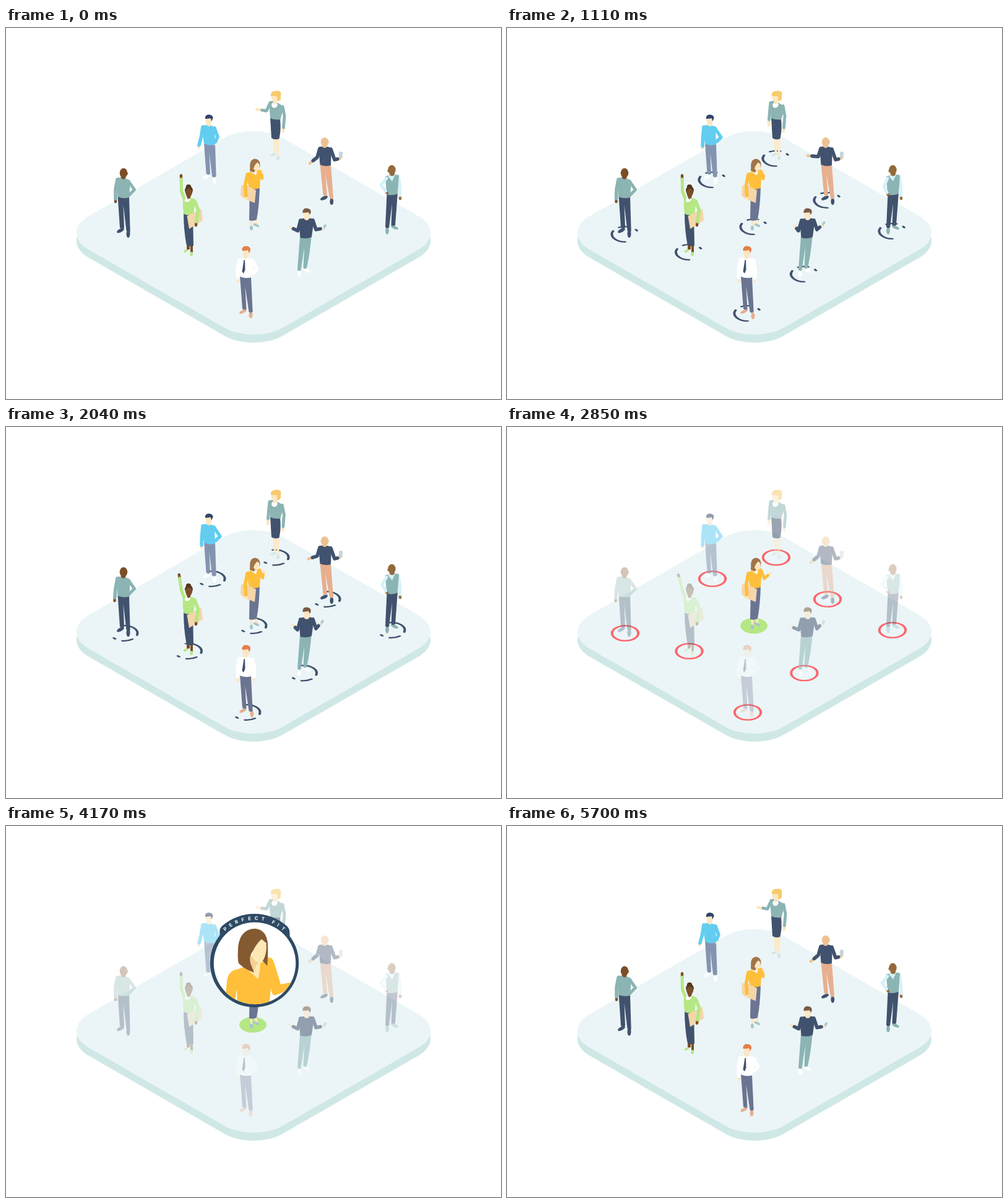
Recreate the animation shown at these times as an HTML page. Size 800 px wide and 600 px high, loop 5730 ms.

```html
<!DOCTYPE html>
<html lang="en">
<head>
<meta charset="utf-8">
<title>Perfect fit</title>
<style>
  html, body { margin: 0; width: 100%; height: 100%; overflow: hidden; background: #fff; }
  svg { display: block; width: 800px; height: 600px; }
  text { font: 700 7.8px Inter, "Open Sans", sans-serif; fill: #fff; text-anchor: middle; }
  .limb path { fill: none; stroke-linecap: round; stroke-linejoin: round; }
</style>
</head>
<body>
<svg id="stage" viewBox="0 0 800 600"></svg>
<script>
const LOOP = 5730;
const KEYS = [0, 1110, 2040, 2850, 3480, 4200];
const NAVY = '#41526e', TEAL = '#8bb4b3', PALE = '#fde6c2', DARK = '#7b4e26', BROWN = '#946a3c',
  GREY = '#6b7491', CORAL = '#e8af8e', BLUE = '#62cdf0', LIME = '#b5e784', GOLD = '#ffbf3b',
  CARD = '#f4d6aa', WHITE = '#fff', INK = '#2e4a64', SKY = '#d6f2fb', TAN = '#edc293';

const clamp = x => Math.min(1, Math.max(0, x));
const lin = (t, a, b) => clamp((t - a) / (b - a));
const ramp = (t, a, b) => { const x = lin(t, a, b); return x * x * (3 - 2 * x); };
const mix = (a, b, k) => a + (b - a) * k;

const P = (fill, d) => `<path fill="${fill}" d="${d}"/>`;
const E = (fill, x, y, rx, ry, rot = 0) =>
  `<ellipse fill="${fill}" cx="${x}" cy="${y}" rx="${rx}" ry="${ry}" transform="rotate(${rot} ${x} ${y})"/>`;

// An arm: shoulder, elbow and hand, blended from base towards alt by the weights at KEYS.
const limbs = [];
function L(skin, sleeve, base, alt = base, weights = [0, 0, 0, 0], { width = 5.6, reach = 4, prop = '' } = {}) {
  limbs.push({ base, alt, weights: [0, ...weights, 0], reach });
  return `<g class="limb"><g>${prop}</g><path stroke="${skin}" stroke-width="4.4"/>` +
    `<path stroke="${sleeve}" stroke-width="${width}"/></g>`;
}

const people = [
  { ring: [435, 211], fade: .52, art: () =>
    P('#fdeac8', 'M431 177L442 178L441 208L438 208L437 186L436 204L433 204Z') +
    E('#d5e6e7', 432, 205, 5, 2, -18) + E('#d5e6e7', 439.5, 210, 2.6, 3.4) +
    P(NAVY, 'M427 145L443 147Q445 164 441.500 179Q435 182 429 178Z') +
    L(PALE, TEAL, [447, 127, 450, 142, 448, 167], [446, 126, 449, 142, 447, 167], [1, .6, 0, 0], { width: 4.8, reach: 6 }) +
    L(PALE, TEAL, [427, 121, 421, 134, 405, 131.5], [426, 121, 424.500, 136, 423, 157], [1, 1, 1, .55], { width: 5, reach: 9 }) +
    P(TEAL, 'M425 119Q430 116 439 121L449 127L443.500 148Q434 149 427 146Z') +
    E(WHITE, 434, 124.500, 5, 4.5, -35) + P(PALE, 'M431 117L438 117L437 122L433 124Z') +
    E(PALE, 433.500, 112.500, 5, 6.5) +
    P('#f6cb6b', 'M428 110Q427 103 434 102Q444 100 444.500 106Q444 111 444 115Q442 119 437 118Q440 114 437 110Z') },

  { ring: [332, 245.5], fade: .52, art: () =>
    E(WHITE, 324, 240.500, 6, 2.6, -28) + E(WHITE, 337, 246, 3, 6) +
    P('#8494b0', 'M320 186L338 188L339.700 240Q336 243 333 240L328.500 202L330 236Q326 239 323.500 235Z') +
    L(PALE, BLUE, [318, 160, 315.500, 176, 311, 193], [318, 160, 316.500, 177, 316, 195], [1, 1, 1, .5]) +
    L(PALE, BLUE, [337, 162, 342, 176, 337, 187.500], [336, 162, 346, 177, 336, 186], [1, 1, 1, .6]) +
    P(BLUE, 'M316 159Q326 154 337 160L338 188Q329 192 320 187Z') +
    P(PALE, 'M324 154L331 154L331 158Q328 161 324 157Z') + E(PALE, 327.500, 150, 5, 6.5) +
    P('#31456a', 'M322 147Q321 140 328 140Q335 141 334.500 146L332 151L331 146Z') },

  { ring: [518, 278.5], fade: .4, art: () =>
    E(NAVY, 514, 275, 6.4, 2.8, -25) + E(NAVY, 526.300, 280.500, 2.9, 5.5) +
    P(CORAL, 'M507.500 220L525 221L529 275Q526 278 523 275L516 236L519 270Q515 273 512.500 270Z') +
    L(TAN, NAVY, [507, 195, 503, 209, 491, 219], [507, 195, 503, 208, 486, 206.500], [1, .45, 0, 0], { reach: 7 }) +
    L(TAN, NAVY, [525, 196, 531, 213, 539.500, 211], undefined, undefined,
      { prop: '<rect x="-2" y="-11" width="6" height="11" rx="1.5" fill="#c6d5dc" transform="rotate(4)"/>' }) +
    P(NAVY, 'M505 193Q515 189 526 194L525 222Q516 225 507.500 221Z') +
    P(TAN, 'M511 188L519 188L519 192Q515 196 511 192Z') + E(TAN, 515, 184.500, 6.3, 7.5) + E(TAN, 520.500, 185, 1.5, 2) },

  { ring: [399, 321.5], art: () =>
    P(PALE, 'M394 309L398.500 309L398 320L395 321ZM400 309L405 309L407 317L404 319Z') +
    E('#a5c6ca', 396.500, 323.500, 2.6, 3.8) + E('#a5c6ca', 404.500, 319, 5.4, 2, 25) +
    P(GREY, 'M394 258L410 258Q409 290 405 310Q399 313 393 311Z') +
    L(PALE, GOLD, [410, 232, 414, 243.500, 413, 232], [410, 231, 416, 245, 426, 236], [.1, .3, 1, 1], { width: 5, reach: 6 }) +
    P(GOLD, 'M388 235Q398 231 412 229L410 259Q401 262 393 260Z') +
    P(CARD, 'M380 254L390 255L404 262.500L402 283L390 278Q382 275 379 270Z') +
    L(PALE, GOLD, [390, 237, 386.700, 254, 388, 277], undefined, undefined, { reach: 6 }) +
    P(WHITE, 'M396 233L404 238L406 232Z') + P(PALE, 'M398 229L406 228L404 235Z') +
    E('#a0754a', 402.500, 221, 8.2, 9.4) + P('#a0754a', 'M394.500 220L394 231L401 234L404 224Z') +
    P(PALE, 'M400 228Q401 222 406 217.500Q411 219 409.500 227Q408 231 404 231Z') },

  { ring: [623, 328.5], fade: .32, art: () =>
    E(TEAL, 616, 328, 2.9, 5.8) + E(TEAL, 628, 322.500, 6.5, 2.5, 25) +
    P(NAVY, 'M615.500 268L633 267L629 319Q626 321 622.500 319L624 284L619 323Q615 325 613 322Z') +
    L(BROWN, SKY, [634, 240, 636.500, 255, 637, 276], undefined, undefined, { width: 5, reach: 5 }) +
    P(TEAL, 'M613 240Q624 235 635 238L633 268Q624 272 615 269Z') +
    L(BROWN, SKY, [615, 243, 606, 254, 616, 267], [615, 243, 609.500, 256, 616, 270], [1, .5, 0, 0], { width: 4.8 }) +
    P(SKY, 'M617 239L624 248L629 237Z') + P(BROWN, 'M620 232L628 232L628 237Q624 242 620 237Z') +
    E(BROWN, 623.500, 229.500, 6.2, 7.8) + E(BROWN, 618, 231, 1.6, 2) },

  { ring: [191, 333.5], fade: .32, art: () =>
    E(NAVY, 185, 327.500, 6.6, 2.8, -28) + E(NAVY, 197.500, 333, 3, 6.2) +
    P(NAVY, 'M180.500 271L199 273L200.700 329Q197 331 194.500 328L189.500 286L191 323Q187 326 184 323Z') +
    L(DARK, TEAL, [180, 245, 177, 261, 177, 281], [180, 245, 177, 261, 175.500, 281], [.3, 1, 1, 0], { reach: 5 }) +
    L(DARK, TEAL, [198, 248, 207.500, 261.500, 197, 272], undefined, undefined, { width: 5 }) +
    P(TEAL, 'M178 243Q189 239 201 247L199 274Q190 277 180.500 273Z') +
    P(DARK, 'M185 237L194 237L193 243Q189 247 186 242Z') + E(DARK, 190, 234.500, 6.3, 7.7) +
    `<g class="nose">${E(DARK, 195.500, 235.500, 1.5, 2)}</g>` },

  { ring: [294.5, 362.5], fade: .32, art: () =>
    P(DARK, 'M292 350L297 350L297 358L292 359ZM298 350L302 350L302 363L298 363Z') +
    E(LIME, 290.500, 360.500, 4, 2, -30) + E(LIME, 299.700, 365.500, 2.4, 3.6) +
    P(NAVY, 'M287 299L302 301L303 352Q297 355 291.500 350Q287 326 287 299Z') +
    L(DARK, LIME, [289.500, 280, 283.500, 264, 283, 238.500], [289.500, 280, 284, 266, 277, 239], [0, .55, 1, 0], { width: 5, reach: 6 }) +
    P(LIME, 'M286 278Q295 272 306 277L303 302Q294 304 287.500 301Q285 289 286 278Z') +
    P(CARD, 'M292.500 304L316 292.500L318 311L296 325Z') +
    L(DARK, LIME, [305, 280, 310.500, 294, 307, 319], undefined, undefined, { reach: 6 }) +
    E(WHITE, 293.500, 277.500, 5, 3.6, -30) + P(DARK, 'M291 270L299 270L298 275L294 277Z') +
    E('#53371f', 295, 257, 4.2, 4) + E('#53371f', 295.500, 262.500, 6.4, 7) + E(DARK, 295.500, 266, 5.5, 6.5) },

  { ring: [480.5, 398], fade: .52, art: () =>
    E(WHITE, 474, 397.500, 2.9, 5.5) + E(WHITE, 486, 392, 6.4, 2.5, 28) +
    P(TEAL, 'M475 337L493.500 338Q491 366 486 388Q483 391 480.500 388L482 355L476.500 392Q473 394 471 391Z') +
    L(PALE, NAVY, [476, 311, 471.500, 328, 459, 322], [476, 311, 471, 328, 464.500, 319.500], [1, .8, -.2, .9], { reach: 6 }) +
    L(PALE, NAVY, [496, 311, 501, 326, 512, 324], [496, 311, 501, 326, 508, 319], [.9, 1.1, 1, 1],
      { prop: '<rect x="-1" y="-8" width="4" height="9" rx="1" fill="#a9cfcb" transform="rotate(32)"/>' }) +
    P(NAVY, 'M473 310Q485 305 498 309L494 338Q485 342 475.500 339Z') +
    P(PALE, 'M482 304L490 304L490 309Q486 313 482 309Z') + E(PALE, 486, 301.500, 5.3, 7) +
    P('#7a5a44', 'M479.500 299Q479 291 486 291.500Q494 292 492.500 299L491 302L489 298Z') },

  { ring: [389, 461.5], fade: .3, art: () =>
    E(CORAL, 383, 458.500, 6.5, 2.5, -28) + `<g class="toe">${E(CORAL, 395.500, 464, 3, 5.5)}</g>` +
    P(GREY, 'M378 401L396 403L398.700 459Q395 462 392.500 459L386.500 418L388.500 455Q385 457 382 454Z') +
    L(PALE, WHITE, [377, 375, 374, 390, 375, 410], undefined, undefined, { reach: 6 }) +
    L(PALE, WHITE, [399, 377, 405.500, 390, 396, 400.500], [399, 377, 401.500, 391, 400.500, 409], [1, 1, 0, 0], { reach: 5 }) +
    P(WHITE, 'M374 374Q387 368 402 375L397 403Q387 406 378 402Z') +
    P(NAVY, 'M384.500 375L386 375L386.500 391L384 397L381.500 394Z') +
    P(PALE, 'M383 367L392 367L391 371Q387 376 384 371Z') + E(PALE, 387.500, 364, 5.3, 7.2) +
    P('#e2804a', 'M381.500 360Q381 352.500 388 352.500Q396 353 395 360L393 364L391 359Q386 361 381.500 360Z') },
];

// Ring arcs on a flat circle; a squash lays them on the floor.
const polar = (r, deg) => [r * Math.cos(deg * Math.PI / 180), r * Math.sin(deg * Math.PI / 180)];
const arc = (r, a, b) => `M${polar(r, a)}A${r} ${r} 0 0 1 ${polar(r, b)}`;
const ARCS = [[90, 205], [242, 288], [323, 332]];
const rings = people.map(({ ring: [x, y], fade }) =>
  `<g transform="translate(${x} ${y}) scale(1 .576)" fill="none" stroke-width="4">` +
  '<path class="spin" stroke="#41526e" stroke-linecap="round"/>' +
  (fade ? '<circle class="reject" r="21.2" stroke="#fb676c"/>' : `<circle class="accept" r="22" fill="${LIME}"/>`) +
  '</g>').join('');

const WORD = [...'PERFECTFIT'];
const ANGLES = [-40.5, -32, -23.7, -15, -6.3, 2.4, 11, 25, 32, 40];

const slab = 'x="-50" y="-50" width="100" height="100" rx="15"';
const iso = y => `transform="matrix(3.136 1.805 -3.136 1.805 400 ${y})"`;
const platform = `<g fill="#cfe8e6"><rect ${slab} ${iso(344.3)}/><rect x="115.500" y="331" width="569" height="13"/></g>` +
  `<rect fill="#ebf5f7" ${slab} ${iso(331.3)}/>`;

const portrait =
  `<g class="sleeve">${P(GOLD, 'M372 232Q358 236 358 254L358 296L373 296L376 250Z')}</g>` +
  `<g class="forearm">${P(GOLD, 'M442 255L474 242L474 252L437 274Q431 276 428 264Z')}</g>` +
  P(GOLD, 'M366 235L386 227L407 247L411 222L423 213Q430 211 433 220L444 256L436 274L428 263L425 294L374 294L373 262Z') +
  P('#fde7b3', 'M392 216L411 216Q411 238 407 247L388 230Z') +
  P('#f5cf95', 'M395 208L408 221Q403 224 401 236L394 224Z') +
  P('#845a30', 'M403 166C386 166 376 178 375 199Q374 216 376 222Q386 232 401 237L395 222Q393 212 397 205' +
    'L413 183L421 190L414 217L422 226Q424 210 423 190Q421 168 403 166Z') +
  P('#fde7b3', 'M397 208Q402 193 412 184Q421 188 421 197Q419 220 409 221Q400 220 397 208Z');

const badge = '<g id="badge">' +
  P(INK, 'M345.500 184V174Q344 166 350 161A79.500 79.500 0 0 1 453 161Q459 166 458.500 174V184Z') +
  E(INK, 401.5, 221.5, 71.7, 71.7) + E(WHITE, 402, 222, 66.3, 66.3) +
  `<g clip-path="url(#lens)">${portrait}</g>` +
  WORD.map(c => `<text x="401.5" y="151.8">${c}</text>`).join('') + '</g>';

const stage = document.getElementById('stage');
stage.innerHTML = '<clipPath id="lens"><circle cx="402" cy="222" r="66.3"/></clipPath>' +
  platform + rings + people.map(p => `<g class="person">${p.art()}</g>`).join('') + badge;

const all = s => [...stage.querySelectorAll(s)];
const one = s => stage.querySelector(s);
const figures = all('.person'), arms = all('.limb'), spins = all('.spin'), rejects = all('.reject'), letters = all('text');
const accept = one('.accept'), badgeEl = one('#badge'), sleeve = one('.sleeve'), forearm = one('.forearm'),
  nose = one('.nose'), toe = one('.toe');

function weightAt(t, w) {
  for (let i = 1; i < KEYS.length; i++)
    if (t < KEYS[i]) return mix(w[i - 1], w[i], ramp(t, KEYS[i - 1], KEYS[i]));
  return 0;
}

function poseArm(t, { base, alt, weights, reach }, el) {
  const k = weightAt(t, weights);
  const [sx, sy, ex, ey, hx, hy] = base.map((v, i) => mix(v, alt[i], k));
  const len = Math.hypot(hx - ex, hy - ey), back = Math.min(1, reach / len);
  const wrist = [mix(hx, ex, back), mix(hy, ey, back)];
  const [prop, hand, cloth] = el.children;
  prop.setAttribute('transform', `translate(${hx} ${hy})`);
  hand.setAttribute('d', `M${wrist}L${hx} ${hy}`);
  cloth.setAttribute('d', `M${sx} ${sy}L${ex} ${ey}L${wrist}`);
}

function drawRings(t) {
  const grow = ramp(t, 120, 650);
  const d = ARCS.map(([a, b]) => arc(21.5, a, a + (b - a) * grow)).join('');
  const turn = (t - 1110) * .182;
  for (const s of spins) {
    s.setAttribute('d', d);
    s.setAttribute('transform', `rotate(${turn})`);
    s.setAttribute('opacity', ramp(t, 60, 300) - ramp(t, 2400, 2600));
  }
  for (const r of rejects) r.setAttribute('opacity', ramp(t, 2430, 2700) - ramp(t, 3060, 3380));
  accept.setAttribute('transform', `scale(${ramp(t, 2430, 2740) - ramp(t, 5400, 5640)})`);
}

function drawBadge(t) {
  const x = lin(t, 3080, 3680) - 1;
  const scale = (1 + 1.7 * x ** 3 + .7 * x * x) * (1 - lin(t, 5130, 5430) ** 3);
  badgeEl.setAttribute('transform', `translate(401.5 293) scale(${Math.max(0, scale)}) translate(-401.5 -293)`);
  const spread = 1 + .35 * (1 - ramp(t, 3480, 4100));
  letters.forEach((el, i) => {
    const angle = ANGLES[0] + (ANGLES[i] - ANGLES[0]) * spread;
    el.setAttribute('transform', `rotate(${angle} 401.5 221.5)`);
    el.setAttribute('opacity', lin(t, 3060 + 60 * i, 3300 + 60 * i));
  });
  const move = ramp(t, 3480, 4780);
  sleeve.setAttribute('transform', `rotate(${9 * move} 372 240)`);
  forearm.setAttribute('transform', `rotate(${22 * move} 438 264)`);
}

function draw(t) {
  const fade = ramp(t, 2430, 2800) - ramp(t, 5430, 5690);
  people.forEach((p, i) => figures[i].setAttribute('opacity', mix(1, p.fade || 1, fade)));
  limbs.forEach((limb, i) => poseArm(t, limb, arms[i]));
  nose.setAttribute('transform', `translate(${-2 * weightAt(t, [0, 1, 1, 0, 0, 0])} 0)`);
  toe.setAttribute('transform', `translate(${2 * weightAt(t, [0, 1, 1, 0, 1, 0])} ${1.5 * weightAt(t, [0, 1, 0, 0, 1, 0])})`);
  drawRings(t);
  drawBadge(t);
}

const start = performance.now();
function tick() {
  draw((performance.now() - start) % LOOP);
  requestAnimationFrame(tick);
}
tick();
</script>
</body>
</html>
```
